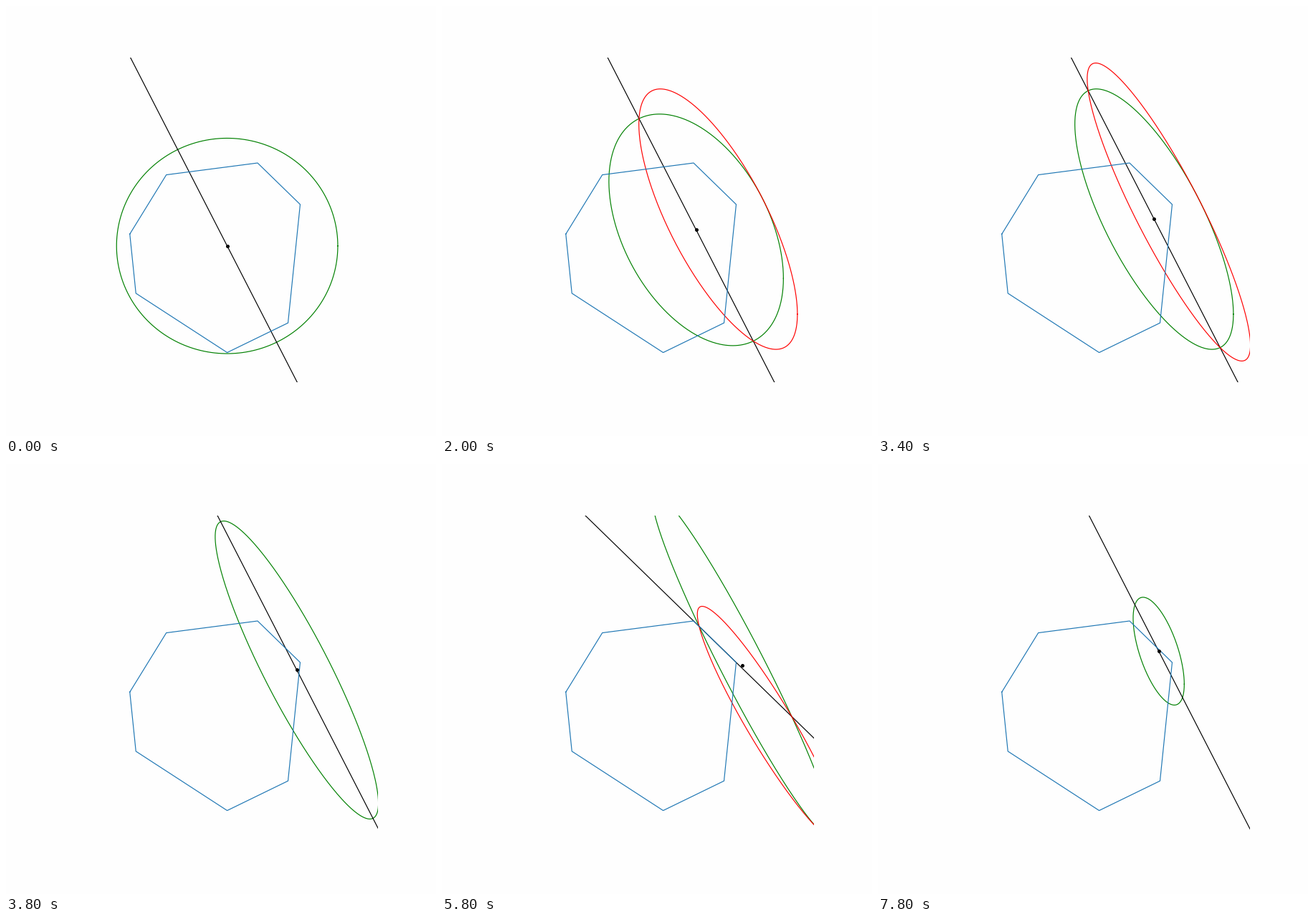
Recreate the animation shown at these times as a matplotlib script. Size 600 by 600 pixels, loop 8000 ms.

```python
import numpy as np
import matplotlib.pyplot as plt
from matplotlib.animation import FuncAnimation

# Ellipsoid method: maximise COST over a convex heptagon, using deep cuts.
SIZE, DPI = 600, 100
ORIGIN = np.array([308.6, 334.75])            # pixel position of (0, 0)
SCALE = np.array([8.49, 8.266])               # pixels per unit
LEFT, TOP, RIGHT, BOTTOM = 75, 72, 519, 524.5  # plot area in pixels

VERTS = np.array([(-16, 2), (-10, 12), (5, 14), (12, 7),
                  (10, -13), (0, -18), (-15, -8)], float)
COST = np.array([2.0, 1.0])
RADIUS = 18.18
FRAMES, INTERVAL = 40, 200
STEPS = 6


def constraints():
    """Outward normals and offsets, clockwise: normal @ x <= offset."""
    for p, q in zip(VERTS, np.roll(VERTS, -1, axis=0)):
        d = q - p
        normal = np.array([-d[1], d[0]])
        yield normal, normal @ p


def choose_cut(center):
    """First violated constraint, or the objective if there is none."""
    for normal, offset in constraints():
        if normal @ center > offset:
            return normal, offset
    return -COST, -COST @ center


def shrink(center, P, normal, offset):
    """Smallest ellipse around the part with normal @ x <= offset."""
    n = 2
    norm = np.sqrt(normal @ P @ normal)
    alpha = (normal @ center - offset) / norm
    g = P @ normal / norm
    tau = (1 + n * alpha) / (n + 1)
    grow = n**2 * (1 - alpha**2) / (n**2 - 1)
    return center - tau * g, grow * (P - 2 * tau / (1 + alpha) * np.outer(g, g))


def outline(center, P):
    a = np.linspace(0, 2 * np.pi, 400)
    pts = np.linalg.cholesky(P) @ np.array([np.cos(a), np.sin(a)])
    return pts + center[:, None]


def cut_line(normal, offset):
    base = normal * offset / (normal @ normal)
    d = np.array([-normal[1], normal[0]]) / np.hypot(*normal)
    return np.array([base - 100 * d, base + 100 * d]).T


def solve():
    center, P = np.zeros(2), RADIUS**2 * np.eye(2)
    states = []
    for _ in range(STEPS + 1):
        cut = choose_cut(center)
        nxt = shrink(center, P, *cut)
        states.append((center, outline(center, P), cut_line(*cut), outline(*nxt)))
        center, P = nxt
    return states


states = solve()

fig = plt.figure(figsize=(SIZE / DPI, SIZE / DPI), dpi=DPI, facecolor="#fefefe")
ax = fig.add_axes([LEFT / SIZE, 1 - BOTTOM / SIZE,
                   (RIGHT - LEFT) / SIZE, (BOTTOM - TOP) / SIZE])
ax.set_axis_off()
ax.set_xlim((np.array([LEFT, RIGHT]) - ORIGIN[0]) / SCALE[0])
ax.set_ylim((ORIGIN[1] - np.array([BOTTOM, TOP])) / SCALE[1])

LW = 0.85
ellipse, = ax.plot([], [], color="green", lw=LW, zorder=2)
line, = ax.plot([], [], color="black", lw=LW, zorder=3)
following, = ax.plot([], [], color="red", lw=LW, zorder=4)
ax.plot(*np.vstack([VERTS, VERTS[:1]]).T, color="tab:blue", lw=LW, zorder=5)
dot, = ax.plot([], [], "o", color="black", ms=3.6, mew=0, zorder=6)


def update(i):
    # each step lasts 20/3 frames; its second half shows the next ellipse
    k, phase = divmod(3 * (i + 1), 20)
    center, curve, cut, nxt = states[k]
    ellipse.set_data(*curve)
    line.set_data(*cut)
    dot.set_data([center[0]], [center[1]])
    following.set_data(*nxt)
    following.set_visible(phase >= 10)
    return ellipse, line, following, dot


anim = FuncAnimation(fig, update, frames=FRAMES, interval=INTERVAL,
                     repeat=True, repeat_delay=0)
plt.show()
```
